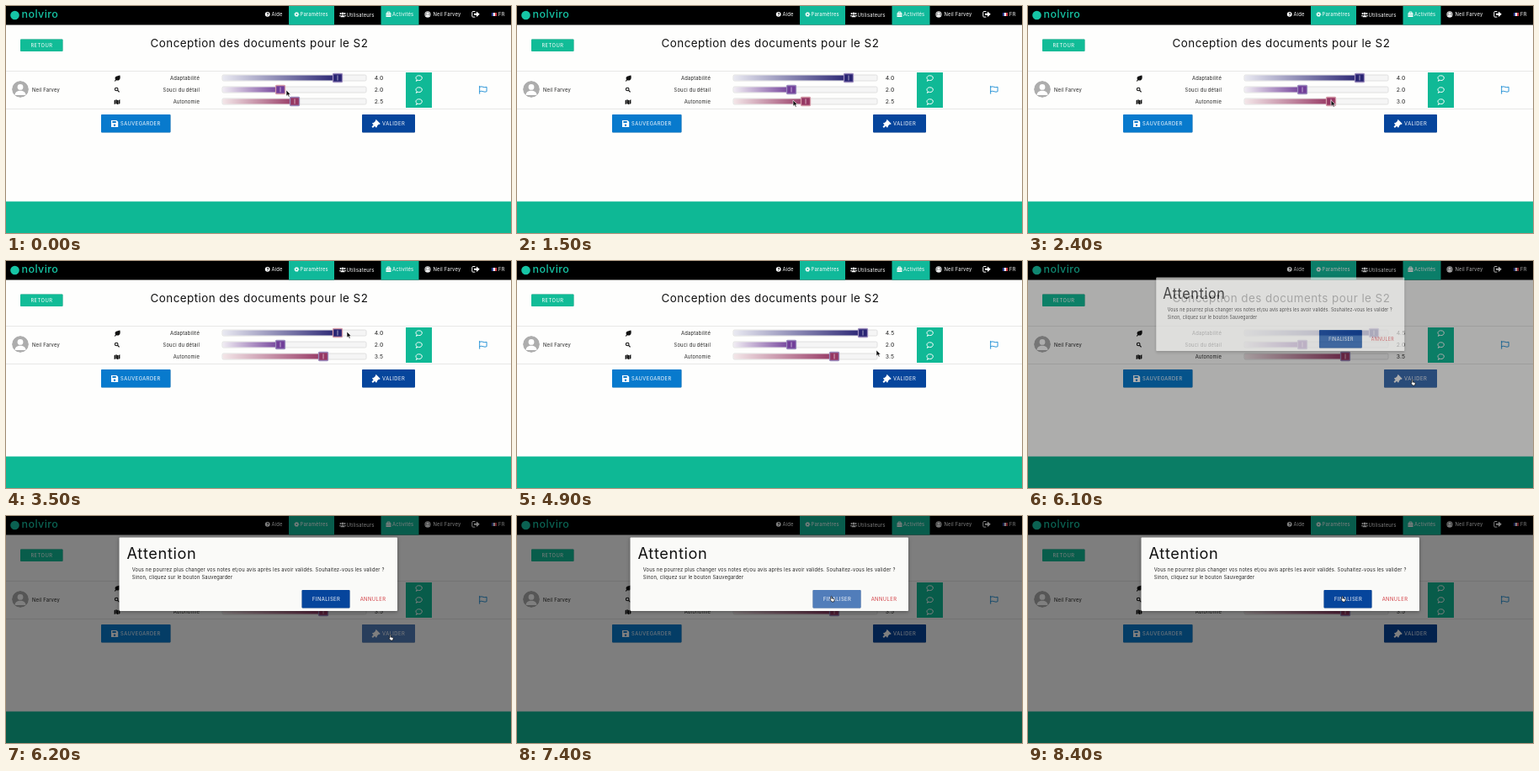
An HTML page for the animation above (8500 ms loop, 600 by 270 pixels).

```html
<!DOCTYPE html>
<html lang="fr">
<head>
<meta charset="utf-8">
<title>Conception des documents</title>
<style>
html, body { margin: 0; width: 100%; height: 100%; overflow: hidden; background: #fefefd; }
svg { display: block; width: 100%; height: 100%; }
text { font: 5.8px Inter, "Open Sans", sans-serif; letter-spacing: .035em; fill: #222; }
.nav text, text.button { fill: #fff; }
text.button { letter-spacing: .45px; text-anchor: middle; }
.end { text-anchor: end; }
text.value { font-size: 6.8px; }
text.body { font-size: 5.75px; }
.line { fill: none; stroke: #fff; stroke-width: 1; stroke-linejoin: round; stroke-linecap: round; }
.shadow { filter: drop-shadow(0 .6px .7px rgba(0,0,0,.3)); }
</style>
</head>
<body>
<svg viewBox="0 0 600 270">
  <defs>
    <clipPath id="validateClip"><rect x="423" y="129" width="63" height="21.5" rx="1"/></clipPath>
    <clipPath id="finishClip"><rect x="351.5" y="88" width="57" height="21.5" rx="1"/></clipPath>
    <clipPath id="avatarClip"><circle r="10"/></clipPath>
    <g id="avatar" clip-path="url(#avatarClip)">
      <circle r="10" fill="#adadad"/><circle cy="-2.6" r="3.4" fill="#fff"/>
      <path d="M-6.5 7C-6.5 0 6.5 0 6.5 7Z" fill="#fff"/>
    </g>
    <path id="bubble" class="line" d="M-3 3L-2.4 1.6C-4.8-.5-3-3.2 0-3.2S4.3-1.6 3.6.5S.5 2.8-1 2.4Z"/>
  </defs>

  <rect width="600" height="270" fill="#fefefd"/>
  <rect y="232.5" width="600" height="37.5" fill="#0eb895"/>

  <g class="nav">
    <rect width="600" height="22.5"/>
    <path d="M336 0h54v22.5h-54zM445.5 0h45v22.5h-45z" fill="#10b99a"/>
    <circle cx="10.5" cy="11" r="5.3" fill="#16c5a5"/>
    <text x="18.5" y="14" style="font-size:12.5px;font-weight:500;fill:#16c5a5">nolviro</text>
    <circle cx="310.7" cy="9.8" r="2.9" fill="#fff"/>
    <text x="309.4" y="11.6" style="font-size:5px;font-weight:700;fill:#000">?</text>
    <text x="315.5" y="12">Aide</text>
    <circle cx="345.3" cy="10" r="1.6" fill="none" stroke="#fff" stroke-width="1.4"/>
    <circle cx="345.3" cy="10" r="2.6" fill="none" stroke="#fff" stroke-width=".9" stroke-dasharray="1.02"/>
    <text x="349.5" y="12">Paramètres</text>
    <g fill="#fff">
      <circle cx="400" cy="9" r="1.5"/><circle cx="397.5" cy="9" r="1"/><circle cx="402.5" cy="9" r="1"/>
      <path d="M397.5 13.3c0-3.2 5-3.2 5 0zM396 12.3c0-2 2-2 2-1l-.8 1zM404 12.3c0-2-2-2-2-1l.8 1z"/>
      <path d="M451.5 8.5h6v4.5h-6z"/>
    </g>
    <path class="line" d="M453 8.5v-1.4h3v1.4"/>
    <path d="M451.5 10.8h6" stroke="#10b99a" stroke-width=".6"/>
    <text x="404.5" y="12.8">Utilisateurs</text>
    <text x="459" y="12">Activités</text>
    <use href="#avatar" transform="translate(501 10) scale(.39)"/>
    <text x="507.5" y="12">Neil Farvey</text>
    <path d="M557 6.5h-2.2q-1 0-1 1v4.6q0 1 1 1h2.2" class="line"/>
    <path d="M556 8.8h3v-2.3l3.8 3.3-3.8 3.3v-2.3h-3z" fill="#fff"/>
    <path d="M577 8h2v4h-2z" fill="#33449a"/><path d="M579 8h2v4h-2z" fill="#fff"/><path d="M581 8h2v4h-2z" fill="#d9404a"/>
    <text x="585" y="12">FR</text>
  </g>

  <rect class="shadow" x="17" y="39.5" width="50.5" height="14.5" rx="1" fill="#11bc97"/>
  <text class="button" x="42.4" y="49">RETOUR</text>
  <text x="171.5" y="48.6" style="font-size:13.4px;fill:#111">Conception des documents pour le S2</text>

  <rect x="-1" y="77.5" width="602" height="45" fill="none" stroke="#e3e3e3" stroke-width=".8"/>
  <use href="#avatar" x="17" y="99"/>
  <text x="31" y="101.7">Neil Farvey</text>

  <path d="M128.8 89.2l1.3-1.6c-1.8-3.6 1.4-4.3 5.3-5.1 1.2 4.8-1.4 7-4.4 5.7l-1.4 1.6z" fill="#111"/>
  <circle cx="131.2" cy="99" r="1.8" fill="none" stroke="#111" stroke-width="1.1"/>
  <path d="M132.6 100.4l2 2" stroke="#111" stroke-width="1.3"/>
  <path d="M128.6 112.3l2-1v5l-2 .8zM131 111.3l2 .9v5l-2-.9zM133.4 112.2l2-.9v4.8l-2 1z" fill="#111"/>

  <g id="sliders"></g>

  <rect class="shadow" x="475" y="79" width="31" height="42" fill="#10b996"/>
  <use href="#bubble" x="490.5" y="86"/><use href="#bubble" x="490.5" y="100"/><use href="#bubble" x="490.5" y="114"/>
  <path d="M562.7 95.3v9M562.7 96.3q2.3-1 4.2 0t4.2 0v5.4q-2 1-4.2 0t-4.2 0" class="line" style="stroke:#2b95d8"/>

  <rect class="shadow" x="113" y="129" width="82.5" height="21.5" rx="1" fill="#087acd"/>
  <path d="M125 136h6.4l1.8 1.8v6.2h-8.2z" fill="#fff"/>
  <path d="M126.4 137h4.3v2h-4.3z" fill="#087acd"/><circle cx="129" cy="141.7" r="1.2" fill="#087acd"/>
  <text class="button" x="159.9" y="142">SAUVEGARDER</text>

  <rect class="shadow" x="423" y="129" width="63" height="21.5" rx="1" fill="#06459c"/>
  <path d="M435.2 144.2l4.2-4.2" stroke="#fff" stroke-width="2"/>
  <path d="M439.8 135l4.9 4.9-1 1-.7-.3-2.4 2.4.3.7-1 1-4.9-4.9 1-1 .7.3 2.4-2.4-.3-.7z" fill="#fff"/>
  <text class="button" x="460.6" y="142">VALIDER</text>
  <g clip-path="url(#validateClip)"><circle id="validateRipple" cx="457" cy="141" fill="#fff"/></g>

  <rect id="overlay" width="600" height="270"/>

  <g id="modal">
    <rect x="134.5" y="25.5" width="330.5" height="87.5" rx="1" fill="#fafaf8" style="filter:drop-shadow(0 1px 2px rgba(0,0,0,.35))"/>
    <text x="143.5" y="51" style="font-size:18.2px;fill:#111">Attention</text>
    <text class="body" x="149.7" y="66.2">Vous ne pourrez plus changer vos notes et/ou avis après les avoir validés. Souhaitez-vous les valider ?</text>
    <text class="body" x="149.7" y="74.6">Sinon, cliquez sur le bouton Sauvegarder</text>
    <rect class="shadow" x="351.5" y="88" width="57" height="21.5" rx="1" fill="#06459c"/>
    <text class="button" x="380.6" y="100.8">FINALISER</text>
    <g clip-path="url(#finishClip)"><circle id="finishRipple" cx="374" cy="97" fill="#fff"/></g>
    <text class="button" x="436" y="100.8" style="fill:#d23c42">ANNULER</text>
  </g>

  <g id="cursor">
    <path id="arrow" d="M0 0V7.2L1.7 5.7L2.9 8.2L4.1 7.6L3 5.2H5.2Z" fill="#111" stroke="#fff" stroke-width=".6"/>
    <path id="hand" d="M0 .8Q.6 0 1.2 .8V3L3.7 3.6Q4.3 3.9 4.1 4.8L3.6 7H1L-.9 4.5Q-.7 3.6 0 4.2Z" fill="#fff" stroke="#111" stroke-width=".7"/>
  </g>
</svg>

<script>
const LOOP = 8500;
const $ = id => document.getElementById(id);
const clamp = v => Math.max(0, Math.min(1, v));
const progress = (t, start, end) => clamp((t - start) / (end - start));
const smooth = p => p * p * (3 - 2 * p);
const set = (el, attrs) => { for (const k in attrs) el.setAttribute(k, attrs[k]); };

const sliders = [
  { label: "Adaptabilité", y: 85.5, pale: "#e9e9f1", color: "#292473", value: t => t < 4100 ? 4 : 4.5 },
  { label: "Souci du détail", y: 99.5, pale: "#f0ecf3", color: "#713e99", value: () => 2 },
  { label: "Autonomie", y: 113.5, pale: "#f3e6e8", color: "#963763", value: t => t < 2300 ? 2.5 : t < 2600 ? 3 : 3.5 }
];

$("sliders").innerHTML = sliders.map(({ label, y, pale, color }, i) => `
  <linearGradient id="fill${i}"><stop stop-color="${pale}"/><stop offset="1" stop-color="${color}"/></linearGradient>
  <text class="end" x="230" y="${y + 2.4}">${label}</text>
  <rect x="257" y="${y - 3.5}" width="171" height="7" rx="1.5" fill="#f5f5f5" stroke="#d9d9d9" stroke-width=".8"/>
  <rect id="bar${i}" x="257.5" y="${y - 3}" height="6" rx="1" fill="url(#fill${i})"/>
  <g id="thumb${i}">
    <rect x="-5.5" y="-5" width="11" height="10" rx="1" fill="${color}" stroke-width="1.3"/>
    <path d="M0-3V3" stroke="#fff" stroke-opacity=".65" stroke-width=".9"/>
  </g>
  <text class="value" id="value${i}" x="437.7" y="${y + 2.7}"></text>`).join("");

// time, x, y
const cursorPath = [
  [0, 333, 100], [300, 333, 101], [900, 330, 117], [1500, 328, 112], [1900, 342, 112],
  [2100, 343, 112], [2700, 377, 112], [2900, 377, 112], [3350, 405, 84], [3500, 405, 84],
  [3800, 395, 84], [3950, 395, 84], [4400, 412, 84], [4650, 412, 84], [5300, 457, 150],
  [5700, 456, 141], [6500, 456, 141], [7100, 373, 95], [LOOP, 373, 95]
];

function cursorAt(t) {
  const next = cursorPath.findIndex(k => k[0] > t);
  const [t0, x0, y0] = cursorPath[next - 1], [t1, x1, y1] = cursorPath[next];
  const p = smooth(progress(t, t0, t1));
  return [x0 + (x1 - x0) * p, y0 + (y1 - y0) * p];
}

function drawSliders(t, cursorY) {
  sliders.forEach(({ y, value }, i) => {
    const v = value(t), x = 258 + 34 * v;
    const hovered = t < 4650 && Math.abs(cursorY + 1 - y) < 4;
    set($("bar" + i), { width: x - 257.5 });
    set($("thumb" + i), { transform: `translate(${x} ${y})`, stroke: hovered ? "#d49aa8" : "#9b8bbd" });
    $("value" + i).textContent = v.toFixed(1);
  });
}

function drawRipple(id, t, start, fadeStart) {
  const growth = progress(t, start, start + 280);
  set($(id), {
    r: 65 * growth,
    opacity: .3 * growth * (1 - progress(t, fadeStart, fadeStart + 400))
  });
}

function draw(t) {
  const [x, y] = cursorAt(t);
  drawSliders(t, y);
  drawRipple("validateRipple", t, 5895, 6300);
  drawRipple("finishRipple", t, 7110, 7450);

  const open = smooth(progress(t, 5955, 6200));
  set($("overlay"), { opacity: open / 2 });
  set($("modal"), {
    opacity: open,
    transform: `translate(299.75 ${-17 * (1 - open)}) scale(${.7 + .3 * open} 1) translate(-299.75 0)`
  });

  const overButton = (t < 6600 && y > 129 && y < 150.5 && x > 423) || (t > 6600 && y < 109.5 && x < 408.5);
  set($("cursor"), { transform: `translate(${x} ${y})` });
  set($("arrow"), { visibility: overButton ? "hidden" : "visible" });
  set($("hand"), { visibility: overButton ? "visible" : "hidden" });
}

function tick() {
  draw(performance.now() % LOOP);
  requestAnimationFrame(tick);
}
tick();
</script>
</body>
</html>
```
